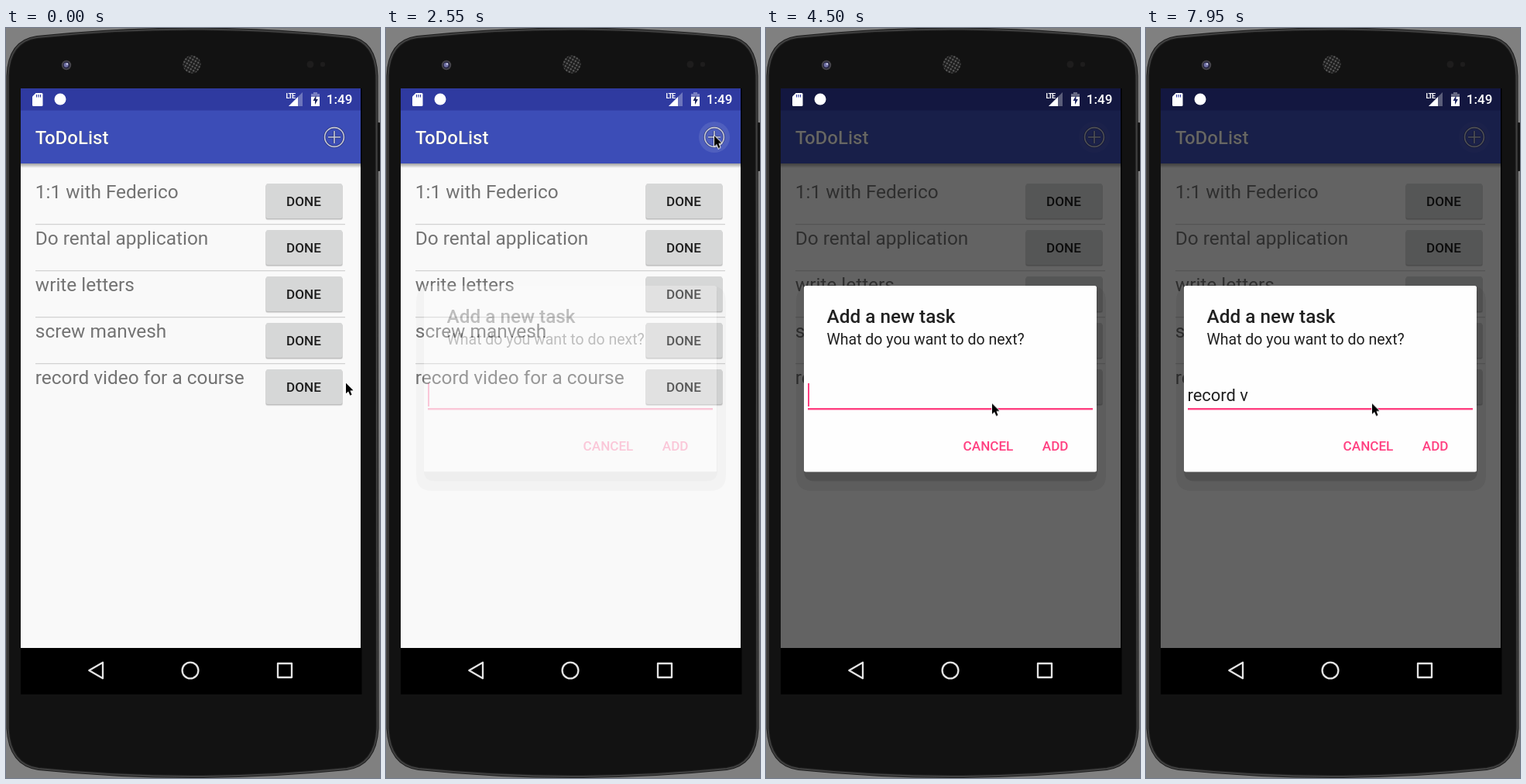
An HTML page for the animation above (8 s loop, 483 by 969 pixels).

```html
<!DOCTYPE html>
<html lang="en">
<head>
<meta charset="utf-8">
<title>To-do list on a phone</title>
<style>
  html, body { margin: 0; width: 100%; height: 100%; overflow: hidden; background: #808080; }
  body { position: relative; font-family: Roboto, sans-serif; }
  .layer { position: absolute; left: 0; top: 0; width: 483px; height: 969px; display: block; }
  text { font-family: Roboto, sans-serif; white-space: pre; }
  .medium { font-weight: 500; }
  .body { font-size: 24.4px; fill: #737373; }
  .button { font-size: 17.1px; font-weight: 500; }

  .cursor, .ripple, .dim, .glow, .shade, .dialog, .entry, .caret {
    animation: 8s step-end infinite;
  }
  .cursor { animation-name: move; }
  .ripple { animation-name: ripple; }
  .dim { animation-name: dim; }
  .glow { animation-name: glow; }
  .shade { animation-name: shade; }
  .dialog { animation-name: show; }

  .entry {
    position: absolute; left: 53.4px; top: 458px; height: 31px;
    font-size: 21.96px; line-height: 34px; color: #212121;
    animation-name: type;
  }
  .entry span { display: block; overflow: hidden; white-space: pre; height: 34px; }
  .caret {
    position: absolute; left: 100%; top: 1px; margin-left: .6px;
    width: 2.4px; height: 30px; background: #ff4081;
    animation-name: blink;
  }

  @keyframes move {
    0% { transform: translate(438px, 458px); }
    1.875% { transform: translate(384px, 420px); }
    3.75% { transform: translate(262px, 316px); }
    5.625% { transform: translate(187px, 251px); }
    15% { transform: translate(214px, 243px); }
    16.875% { transform: translate(288px, 221px); }
    18.75% { transform: translate(354px, 194px); }
    20.625% { transform: translate(392px, 171px); }
    22.5% { transform: translate(412px, 152px); }
    24.375% { transform: translate(420px, 142px); }
    26.25% { transform: translate(423px, 138.5px); }
    37.5% { transform: translate(404px, 196px); }
    39.375% { transform: translate(354px, 328px); }
    41.25% { transform: translate(316px, 440px); }
    43.125% { transform: translate(298px, 495px); }
    45% { transform: translate(293px, 490px); }
    46.875%, 100% { transform: translate(291px, 484.5px); }
  }
  @keyframes ripple { 0% { opacity: 0; } 31.875% { opacity: .1; } 33.75%, 100% { opacity: .04; } }
  @keyframes dim { 0% { opacity: 0; } 33.75%, 100% { opacity: .6; } }
  @keyframes glow { 0% { opacity: 0; } 31.875% { opacity: .4; } 33.75%, 100% { opacity: 1; } }
  @keyframes shade { 0% { opacity: 0; } 31.875% { opacity: .16; } 33.75%, 100% { opacity: 1; } }
  @keyframes show { 0% { opacity: 0; } 31.875% { opacity: .27; } 33.75%, 100% { opacity: 1; } }
  @keyframes type {
    0% { width: 0; }
    73.125% { width: .868em; }
    80.625% { width: 1.392em; }
    82.5% { width: 1.962em; }
    84.375% { width: 2.3em; }
    88.125% { width: 3.112em; }
    93.75%, 100% { width: 3.6em; }
  }
  @keyframes blink {
    0% { opacity: 1; }
    37.5% { opacity: 0; }
    45% { opacity: 1; }
    50.625% { opacity: 0; }
    56.25% { opacity: 1; }
    61.875% { opacity: 0; }
    69.375% { opacity: 1; }
    78.75% { opacity: 0; }
    80.625% { opacity: 1; }
    99.375%, 100% { opacity: 0; }
  }
</style>
</head>
<body>

<svg class="layer" viewBox="0 0 483 969">
  <defs>
    <pattern id="mesh" width="4" height="4" patternUnits="userSpaceOnUse" patternTransform="translate(240 47) rotate(30)">
      <rect width="4" height="4" fill="#1b1b1b"/>
      <circle cx="2" cy="2" r="1.25" fill="#5c5c5c"/>
    </pattern>
    <linearGradient id="drop" x2="0" y2="1">
      <stop stop-color="#000" stop-opacity=".36"/>
      <stop offset="1" stop-color="#000" stop-opacity="0"/>
    </linearGradient>
    <g id="done">
      <rect x="335" y="202" width="100" height="46.3" rx="3" fill="#000" opacity=".09"/>
      <rect x="335.6" y="202" width="98.8" height="45.2" rx="2.5" fill="#000" opacity=".16"/>
      <rect x="336" y="201" width="98" height="45" rx="2" fill="#d6d7d7"/>
      <text class="button" x="384.5" y="230.4" text-anchor="middle" fill="#1c1c1c">DONE</text>
    </g>
    <path id="rule" d="M38 253.7H438" stroke="#d2d2d2" stroke-width="1.2"/>
    <path id="plus" d="M411.6 141A12.4 12.4 0 1 1 436.4 141A12.4 12.4 0 1 1 411.6 141M416 141H432M424 133V149" fill="none"/>
    <path id="shell" d="M2.5 62Q4 17 40 12Q240 -9 443 12Q477 17 478.5 62L479.5 905Q477 952 440 957Q240 977 42 957Q5 952 2.5 905Z"/>
  </defs>

  <!-- phone -->
  <rect x="480" y="122" width="3" height="63" rx="1" fill="#111"/>
  <use href="#shell" fill="#121212" stroke="#1c1c1c" stroke-width="4"/>
  <use href="#shell" fill="none" stroke="#404040" stroke-width="2"/>
  <circle cx="78" cy="48" r="6.2" fill="#47454b"/>
  <circle cx="78" cy="48" r="4.4" fill="#23233e"/>
  <circle cx="77.7" cy="47.7" r="3" fill="#7272a6"/>
  <circle cx="79" cy="46.5" r="1.2" fill="#d0d0e6"/>
  <circle cx="240" cy="47" r="11.5" fill="url(#mesh)"/>
  <circle cx="393" cy="47" r="4.5" fill="#1e1d1d"/>
  <circle cx="409" cy="47" r="3.2" fill="#1e1d1d"/>
  <rect x="19" y="78" width="440.5" height="783" fill="#000"/>

  <!-- app -->
  <rect x="19" y="78" width="439" height="723" fill="#f9f9f9"/>
  <rect x="19" y="175" width="439" height="6" fill="url(#drop)"/>
  <rect x="19" y="106" width="439" height="69" fill="#3c4db7"/>
  <rect x="19" y="78" width="439" height="28.5" fill="#2f3aa0"/>
  <text class="medium" x="37.8" y="150.2" font-size="24">ToDoList</text>
  <text class="medium" x="37.8" y="150.2" font-size="24" fill="#fff">ToDoList</text>
  <circle class="ripple" cx="424" cy="141" r="20" fill="#fff"/>
  <use href="#plus" stroke="#000" stroke-opacity=".25" stroke-width="3.4"/>
  <use href="#plus" stroke="#c6c7d2" stroke-width="1.6"/>

  <g class="body">
    <text x="37.8" y="220.3">1:1 with Federico</text>
    <text x="37.8" y="280.3">Do rental application</text>
    <text x="37.8" y="340.3">write letters</text>
    <text x="37.8" y="400.3">screw manvesh</text>
    <text x="37.8" y="460.3">record video for a course</text>
  </g>
  <use href="#done"/><use href="#rule"/>
  <use href="#done" y="60"/><use href="#rule" y="60"/>
  <use href="#done" y="120"/><use href="#rule" y="120"/>
  <use href="#done" y="180"/><use href="#rule" y="180"/>
  <use href="#done" y="240"/>

  <rect class="dim" x="19" y="78" width="439" height="723" fill="#000"/>

  <!-- dialog shadow, open where the dialog sits -->
  <g fill-rule="evenodd">
    <g class="glow">
      <path d="M59 333H419Q439 333 439 353V578Q439 598 419 598H59Q39 598 39 578V353Q39 333 59 333ZM49 333V573H427V333Z" opacity=".06"/>
    </g>
    <g class="shade">
      <path d="M49 340H428V572Q428 585.5 414 585.5H63Q49 585.5 49 572ZM49 340V573H427V340Z" opacity=".13"/>
    </g>
  </g>

  <!-- status bar -->
  <g fill="#fff">
    <path d="M38.5 84H46Q47.5 84 47.5 85.5V99.5Q47.5 101 46 101H35.5Q34 101 34 99.5V88.5Z"/>
    <path d="M39.5 86V89.5M42 86V89.5M44.5 86V89.5" stroke="#2f3aa0" stroke-width="1.1"/>
    <circle cx="70" cy="92" r="7.5"/>
    <text x="361.6" y="90.5" font-size="9" font-weight="700" letter-spacing="-1.1">LTE</text>
    <path d="M383 83V101H365Z" opacity=".3"/>
    <path d="M377 89V101H365Z"/>
    <path d="M397 83H402V85H405V101H394V85H397Z" opacity=".35"/>
    <path d="M394 89H405V101H394Z"/>
    <path d="M400.5 87L396.5 94H399V99L403 92H400.5Z" fill="#1b2260"/>
    <text class="medium" x="413.7" y="98.4" font-size="17.1">1:49</text>
  </g>

  <!-- navigation bar -->
  <g fill="none" stroke="#e4e4e4" stroke-width="2.3" stroke-linejoin="round">
    <path d="M107.3 830L125 819.7V840.3Z"/>
    <circle cx="238" cy="830" r="10.4"/>
    <rect x="351" y="821" width="18" height="18"/>
  </g>
</svg>

<div class="layer dialog">
  <svg class="layer" viewBox="0 0 483 969">
    <rect x="49" y="333" width="378" height="240.5" rx="2.5" fill="#fefefe"/>
    <g fill="#212121">
      <text class="medium" x="78.5" y="381.3" font-size="24.3">Add a new task</text>
      <text x="78.5" y="409" font-size="19.5">What do you want to do next?</text>
    </g>
    <rect x="54" y="491" width="368" height="2.4" fill="#ff4081"/>
    <g class="button" fill="#ff4081">
      <text x="254.6" y="546">CANCEL</text>
      <text x="356.8" y="546">ADD</text>
    </g>
  </svg>
  <div class="entry"><span>record v</span><i class="caret"></i></div>
</div>

<svg class="layer" viewBox="0 0 483 969">
  <g class="cursor">
    <path d="M1 .8V14.3L4.1 11.4L6.4 16.8L8.6 15.8L6.4 10.6L10.5 10.3Z"
          fill="#000" stroke="#fff" stroke-width="1.7" stroke-linejoin="round" paint-order="stroke"/>
  </g>
</svg>

</body>
</html>
```
